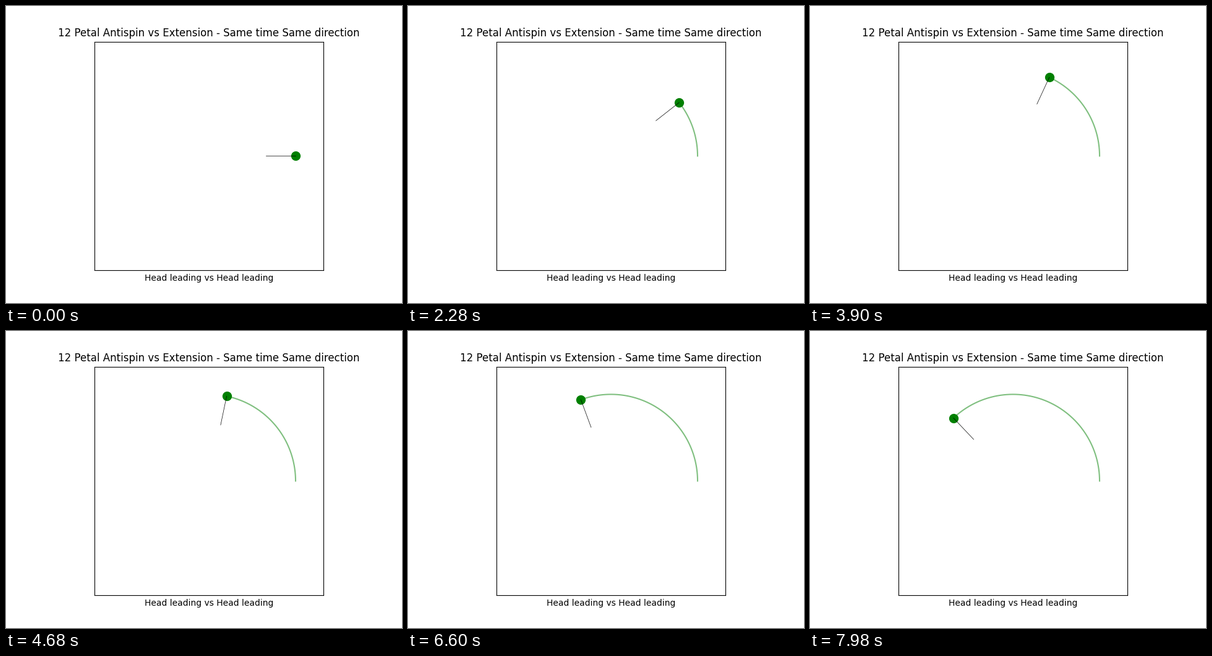
Recreate the animation shown at these times as a matplotlib script. Size 640x480 px, loop 8 s.

```python
import numpy as np
import matplotlib.pyplot as plt
from matplotlib.animation import FuncAnimation

INTERVAL = 20      # ms per tick
TICKS = 400        # 8 s loop
HOLD = 3           # ticks per pose
ARM = 0.66         # hand circle radius, head circle radius is 1
LIMIT = 1.32

theta = np.linspace(0, 2 * np.pi, 360)
head_x, head_y = np.cos(theta), np.sin(theta)
hand_x, hand_y = ARM * head_x, ARM * head_y

fig, ax = plt.subplots(figsize=(6.4, 4.8), dpi=100)
ax.set_aspect("equal")
ax.set_xlim(-LIMIT, LIMIT)
ax.set_ylim(-LIMIT, LIMIT)
ax.set_xticks([])
ax.set_yticks([])
ax.set_title("12 Petal Antispin vs Extension - Same time Same direction")
ax.set_xlabel("Head leading vs Head leading")

trail, = ax.plot([], [], color="green", alpha=0.5, lw=1.5)
head, = ax.plot([], [], "o", color="green", markersize=10)
tether, = ax.plot([], [], color="black", lw=0.5)


def update(tick):
    i = tick // HOLD
    trail.set_data(head_x[:i + 1], head_y[:i + 1])
    head.set_data([head_x[i]], [head_y[i]])
    tether.set_data([hand_x[i], head_x[i]], [hand_y[i], head_y[i]])
    return trail, head, tether


anim = FuncAnimation(fig, update, frames=TICKS, init_func=lambda: update(0),
                     interval=INTERVAL, repeat=True, repeat_delay=0)
plt.show()
```
